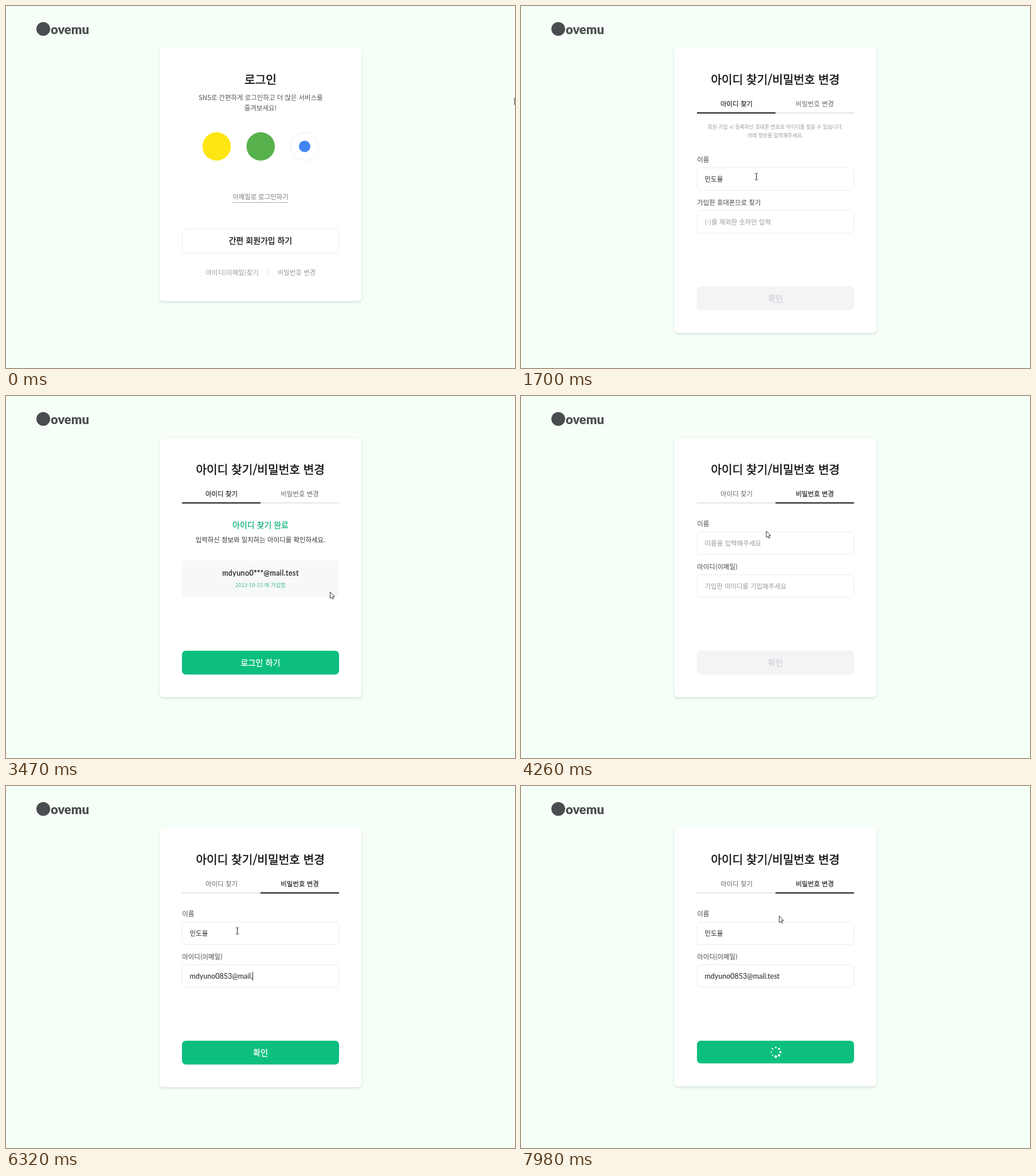
Recreate the animation shown at these times as an HTML page. Size 888 px wide and 631 px high, loop 8000 ms.

```html
<!DOCTYPE html>
<html lang="ko">
<head>
<meta charset="utf-8">
<title>로그인</title>
<style>
  html, body { margin: 0; width: 100%; height: 100%; overflow: hidden; background: #f5fff7; }
  svg { display: block; font-family: "Noto Sans CJK KR", "Noto Sans CJK", sans-serif; }
  .mid { text-anchor: middle; }
  .medium { stroke: currentColor; stroke-width: .023em; }
  .latin { font-family: Lato, "Noto Sans CJK KR", sans-serif; }
  #card { filter: drop-shadow(0 2px 2px rgba(0, 20, 10, .13)); }
  .box { fill: #fff; stroke: #e9ebed; }
</style>
</head>
<body>
<svg id="stage" width="888" height="631" viewBox="0 0 888 631"></svg>
<script>
const stage = document.getElementById('stage');
const GREEN = '#0cbf7e', DARK = '#0a9a5e';
const NAME = ['', 'ㅁ', '미', '민', '민ㄷ', '민도', '민동', '민도유', '민도율'];
const USER = 'mdyuno0853', HOST = '@mail.test', PHONE = '01000000000';

// y is the vertical centre of the line
const text = (s, x, y, size, color, cls = '', id = '') =>
  `<text ${id && `id="${id}"`} class="${cls}" x="${x}" y="${y}" dy="${size * .38}" font-size="${size}" fill="${color}" color="${color}">${s}</text>`;
const mid = (s, x, y, size, color, cls = '', id = '') => text(s, x, y, size, color, 'mid ' + cls, id);
const box = y => `<rect class="box" x="307" y="${y}" width="274" height="39.5" rx="7"/>`;
const dot = (x, y, r, attrs) => `<circle cx="${x}" cy="${y}" r="${r}" ${attrs}/>`;

const spinnerDots = Array.from({ length: 8 }, (_, i) => {
  const a = -i * Math.PI / 4;
  return dot(8 * Math.cos(a), 8 * Math.sin(a), 2.4 * .9 ** i, 'fill="#fff"');
}).join('');

stage.innerHTML = `
  ${dot(65, 40, 12, 'fill="#4a4d50"')}
  <text x="78" y="49" font-size="22" font-weight="900" fill="#4a4d50" class="latin">ovemu</text>
  <rect id="card" x="267.5" y="73.5" width="353" rx="7" fill="#fff"/>

  <g id="login">
    ${mid('로그인', 444, 128, 20.3, '#111', 'medium')}
    ${mid('SNS로 간편하게 로그인하고 더 많은 서비스를', 444.3, 160, 11.45, '#555')}
    ${mid('즐겨보세요!', 444, 177.5, 11.45, '#555')}
    ${dot(367.5, 244.8, 24.7, 'fill="#fee612"')}
    ${dot(444.3, 244.8, 24.7, 'fill="#57b14c"')}
    ${dot(521, 244.8, 24.5, 'fill="#fff" stroke="#eee"')}
    ${dot(521, 244.8, 10, 'fill="#4285f4"')}
    ${mid('이메일로 로그인하기', 444, 333, 11.4, '#777')}
    <path d="M395 342.5H493" stroke="#aaa"/>
    <rect class="box" x="307.5" y="388.5" width="273" height="42" rx="6"/>
    ${mid('간편 회원가입 하기', 444, 409, 13.95, '#111', 'medium')}
    ${mid('아이디(이메일)찾기', 394.7, 465, 11.5, '#999')}
    <path d="M457.5 458V473" stroke="#e3e5e7"/>
    ${mid('비밀번호 변경', 507, 465, 11.5, '#999')}
  </g>

  <g id="account">
    ${mid('아이디 찾기/비밀번호 변경', 443.7, 128, 20.3, '#111', 'medium')}
    ${mid('아이디 찾기', 376, 170.5, 11.5, '#333', '', 'tab0')}
    ${mid('비밀번호 변경', 512.5, 170.5, 11.5, '#333', '', 'tab1')}
    <rect x="307" y="185" width="274" height="2.7" fill="#e8eaeb"/>
    <rect id="bar" y="185" width="137" height="2.7" fill="#474a4d"/>
  </g>

  <g id="help">
    ${mid('회원 가입 시 등록하신 휴대폰 번호로 아이디를 찾을 수 있습니다.', 443.7, 211, 8.85, '#999')}
    ${mid('아래 정보를 입력해주세요.', 443.7, 225.5, 8.85, '#999')}
  </g>

  <g id="form">
    ${text('이름', 307.3, 267.5, 11.4, '#444')}
    ${box(282)}
    ${text('', 320.5, 302, 11.5, '#222', '', 'name')}
    ${text('', 307.3, 342.5, 11.4, '#444', '', 'label')}
    ${box(356.5)}
    ${text('', 320.5, 376.5, 11.4, '#999', '', 'hint')}
    ${text('', 320.5, 376.5, 12.5, '#222', 'latin', 'value')}
    <rect id="caret" width="1" height="15" fill="#222"/>
  </g>

  <g id="done">
    ${mid('아이디 찾기 완료', 444, 224.5, 14, '#12b57c', 'medium')}
    ${mid('입력하신 정보와 일치하는 아이디를 확인하세요.', 444, 250.5, 11.45, '#333')}
    <rect x="307" y="287" width="274" height="63.5" fill="#f7f8fa"/>
    <g letter-spacing=".45">${mid(USER.slice(0, 7) + '***' + HOST, 444, 308.5, 12.5, '#222', 'latin medium')}</g>
    ${mid('2023-10-23 에 가입함', 444, 329.5, 9.4, '#45bd92')}
  </g>

  <g id="submit">
    <rect id="face" x="307" width="274" rx="6.5"/>
    ${mid('', 444, 20.5, 14.1, '#fff', 'medium', 'caption')}
    <g id="spinner">${spinnerDots}</g>
  </g>

  <g id="arrow"><path d="M.5.5V11.8L3.1 9.5 4.9 13 6.6 12.2 4.9 8.6H8.2Z" fill="#fff" stroke="#222" stroke-width=".9"/></g>
  <g id="hand"><path d="M-1.2 6V1.2Q0-.5 1.3 1.2V5Q2.6 4 3.7 5.3 5 4.6 6 6 7.8 5.6 7.8 7.4V10.5L6.4 14.5H-.6L-3.8 9.2Q-4.2 7.4-2.6 7.6L-1.2 9Z" fill="#fff" stroke="#222" stroke-width=".9"/></g>
  <g id="beam"><path d="M-2.5-5.5H-.7L0-5 .7-5.5H2.5M0-5V5M-2.5 5.5H-.7L0 5 .7 5.5H2.5" fill="none" stroke="#222"/></g>`;

const el = {};
stage.querySelectorAll('[id]').forEach(e => el[e.id] = e);
const show = (id, on) => el[id].setAttribute('display', on ? 'inline' : 'none');
const set = (id, attrs) => { for (const k in attrs) el[id].setAttribute(k, attrs[k]); };
const move = (id, x, y, turn = 0) => set(id, { transform: `translate(${x} ${y}) rotate(${turn})` });
const clamp = v => Math.max(0, Math.min(1, v));
const typed = (s, t, a, b) => s.slice(0, Math.floor(clamp((t - a) / (b - a)) * s.length));

// pointer stops: time, x, y
const STOPS = [
  [0, 886.7, 160], [20, 886.7, 160], [400, 395, 463], [560, 395, 463], [770, 432, 371],
  [830, 432, 371], [960, 410.5, 297.5], [2480, 410.5, 297.5], [2640, 450, 503], [2960, 450, 503],
  [3470, 565, 341], [3710, 508, 176], [4130, 508, 176], [4320, 403.5, 252.5],
  [6700, 403.5, 252.5], [7000, 448, 457.5], [7330, 448, 457.5], [7500, 449, 434], [7980, 450, 226], [8000, 450, 226]
];
function pointer(t) {
  const i = STOPS.findIndex(s => s[0] > t);
  const [a, x, y] = STOPS[i - 1], [b, X, Y] = STOPS[i];
  const p = (t - a) / (b - a), e = p * p * (3 - 2 * p);
  return [x + (X - x) * e, y + (Y - y) * e];
}

function draw(t) {
  const scene = t < 560 ? 'login' : t < 2780 ? 'find' : t < 4150 ? 'done' : 'reset';
  const login = scene === 'login', done = scene === 'done', reset = scene === 'reset';
  const form = !login && !done;
  const shift = scene === 'find' ? 0 : -45;
  const busy = scene === 'find' ? t >= 2690 : reset && t >= 7150;
  const [x, y] = pointer(t);
  const inside = (top, bottom) => x > 307 && x < 581 && y >= top && y <= bottom;

  show('login', login);
  show('account', !login);
  show('help', scene === 'find');
  show('form', form);
  show('done', done);
  show('submit', !login);
  set('card', { height: login ? 441 : 496.5 + shift - (busy ? 1.5 : 0) });

  set('bar', { x: reset ? 444 : 307 });
  for (const i of [0, 1]) {
    const on = reset === !!i;
    el['tab' + i].classList.toggle('medium', on);
    set('tab' + i, { fill: on ? '#333' : '#666', color: '#333' });
  }

  const value = reset ? typed(USER, t, 5240, 6040) + typed(HOST, t, 6040, 6500) : typed(PHONE, t, 1710, 2310);
  const namePart = reset ? (t - 4470) / 330 : (t - 980) / 550;
  const name = NAME[Math.floor(clamp(namePart) * 8)];
  move('form', 0, shift);
  el.name.textContent = name || '이름을 입력해주세요';
  set('name', { fill: name ? '#222' : '#999' });
  el.label.textContent = reset ? '아이디(이메일)' : '가입한 휴대폰으로 찾기';
  el.hint.textContent = value ? '' : reset ? '가입한 아이디를 기입해주세요' : '(-)를 제외한 숫자만 입력';
  el.value.textContent = value;

  const inName = name && namePart < 1;
  const inValue = reset ? t >= 5070 && t < 6900 : t > 1710 && t < 2640;
  show('caret', form && (inName || inValue));
  if (form) set('caret', {
    x: 320 + Math.round(el[inName ? 'name' : 'value'].getComputedTextLength()),
    y: inName ? 294.5 : 369
  });

  const top = 489 + shift, height = busy ? 39.5 : 41.5;
  const active = done || value !== '';
  const hover = !login && active && inside(top, top + height);
  move('submit', 0, top);
  set('face', { height, fill: !active ? '#f3f4f6' : hover ? DARK : GREEN });
  el.caption.textContent = busy ? '' : done ? '로그인 하기' : '확인';
  const ink = active ? '#fff' : '#d0d2d5';
  set('caption', { fill: ink, color: ink });
  show('spinner', busy);
  move('spinner', 444.5, 19.8, 90 + (t - 7980) / 4);

  const onLink = login ? t > 380 : inside(163, 188);
  const onField = form && (inside(282 + shift, 321 + shift) || inside(357 + shift, 396 + shift));
  const kind = hover || onLink ? 'hand' : onField ? 'beam' : 'arrow';
  for (const k of ['arrow', 'hand', 'beam']) show(k, k === kind);
  move(kind, x, y);
}

function tick() {
  draw(performance.now() % 8000);
  requestAnimationFrame(tick);
}
tick();
</script>
</body>
</html>
```
